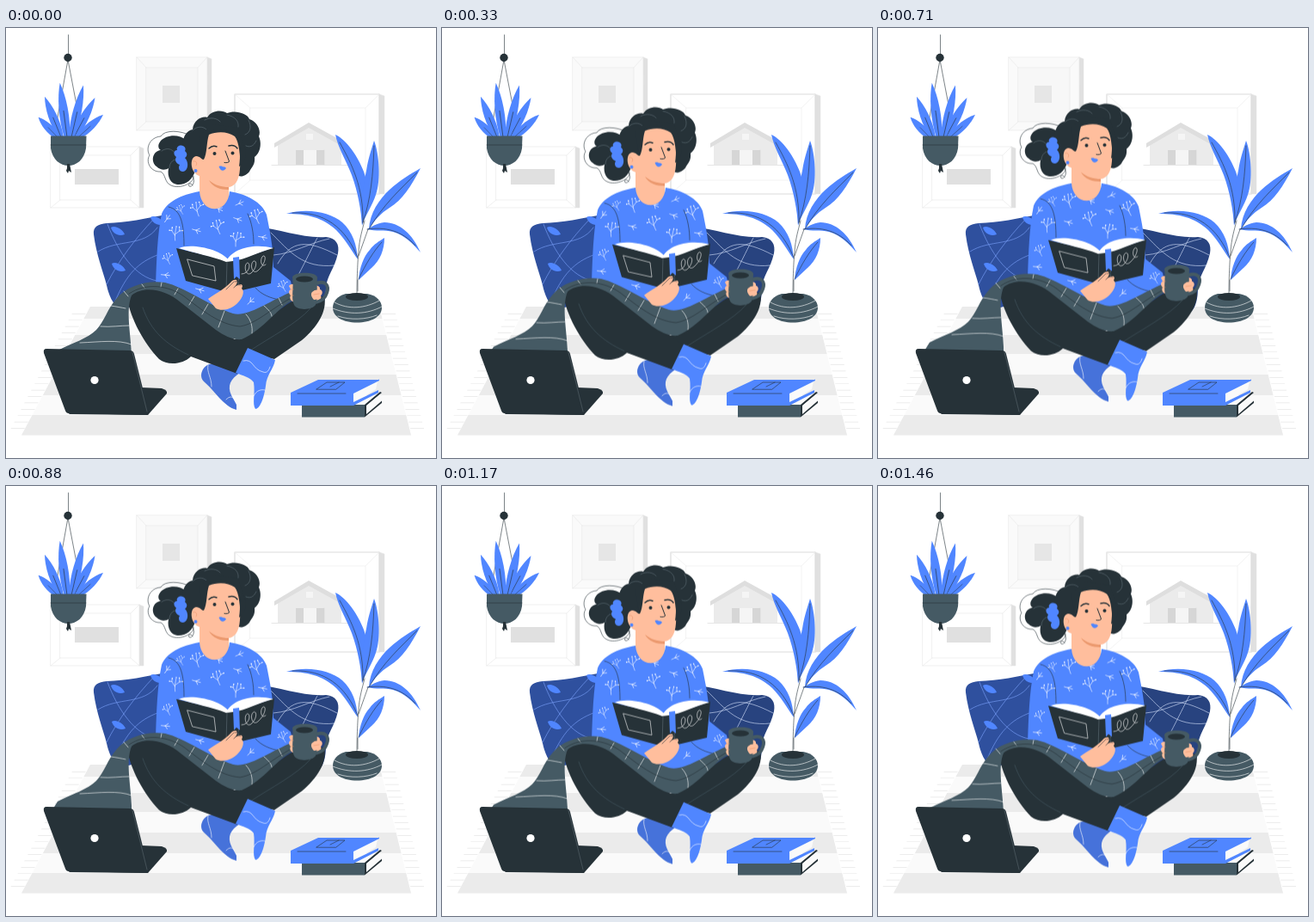
These frames come from a looping animation (500 px wide and 500 px high, 1500 ms). An HTML page:

```html
<!DOCTYPE html>
<html lang="en">
<head>
<meta charset="utf-8">
<title>Reading at home</title>
<style>
  html, body { margin: 0; width: 100%; height: 100%; overflow: hidden; background: #fff; }
  svg { display: block; width: 100vw; height: 100vh; }
  .blue { fill: #5086ff; }
  .dark { fill: #263238; }
  .gray { fill: #455a64; }
  .skin { fill: #ffbe9d; }
  .line { fill: none; stroke-width: .6; stroke-linecap: round; stroke-linejoin: round; }
  .ink { stroke: #263238; }
  .chalk { stroke: #fff; }
  .pale { stroke: #e6e6e6; }
  .bold { stroke-width: 1.5; }
  .float { animation: float 1.5s linear infinite; }
  @keyframes float { 50% { transform: translateY(-10px); } }
</style>
</head>
<body>
<svg viewBox="0 0 500 500" xmlns="http://www.w3.org/2000/svg">
  <defs>
    <clipPath id="rug"><path d="M98 324H434L471 473.500H18Z"/></clipPath>
    <path id="top" d="M225 190C203 194 187 202 181 216C176 240 175 270 174 302L205 318L262 345L300 330L335 316L331 294L311 278C311 255 306 232 303 217C298 203 280 193 260 190C258 217 227 217 225 190Z"/>
    <clipPath id="topClip"><use href="#top"/></clipPath>
    <g id="blade">
      <path class="blue" d="M-3 0C-7 -22 -5 -46 0 -62C5 -46 7 -22 3 0Z"/>
      <path class="line ink" d="M0 0V-30"/>
    </g>
    <g id="sprig" class="line chalk">
      <path d="M1 10C-1 4 0 -2 0 -7M0 4L-5 -2M0 2L5 -3M-5 -2H-8M-5 -2V-6M5 -3L9 -4M5 -3L4 -8"/>
      <path stroke-width="1.600" d="M-8 -2h0M-5 -6h0M9 -4h0M4 -8h0M0 -8h0"/>
    </g>
    <path id="twig" class="line chalk" d="M-4 2L5 -2M0 0L2 -4M0 0L4 2"/>
    <path id="petal" class="blue" d="M-8 -4C-4 -7 5 -3 8 4C1 7 -6 3 -8 -4Z"/>
  </defs>

  <!-- pictures on the wall -->
  <g class="line pale">
    <path fill="#e0e0e0" d="M234 34L239 36V119H234Z"/>
    <path fill="#fafafa" d="M152 34H234V119H152Z"/>
    <path fill="#f7f7f7" d="M163 46H223V109H163ZM152 34L163 46M234 34L223 46M152 119L163 109M234 119L223 109"/>
    <path fill="#e6e6e6" stroke="none" d="M182 67H202V87H182Z"/>

    <path fill="#e0e0e0" d="M155 138L160 140V209H155Z"/>
    <path fill="#fff" d="M52 138H155V209H52Z"/>
    <path d="M63 148H145V200H63ZM52 138L63 148M155 138L145 148M52 209L63 200M155 209L145 200"/>
    <path fill="#e0e0e0" stroke="none" d="M80 164H131V182H80Z"/>

    <path fill="#e0e0e0" d="M434 77L440 79V193H434Z"/>
    <path fill="#fff" stroke="#dcdcdc" stroke-width="1.200" d="M266 77H434V193H266Z"/>
    <path stroke="#ebebeb" d="M284 93H418V177H284ZM266 77L284 93M434 77L418 93M266 193L284 177M434 193L418 177"/>
  </g>
  <path fill="#ebebeb" d="M316 134L352 113L390 133V159H316Z"/>
  <path fill="#dedede" d="M352 110L392 132V138L352 116L312 139V134Z"/>
  <path fill="#d6d6d6" d="M337 142H370V159H337Z"/>
  <path fill="#f5f5f5" d="M346 142H361V159H346ZM349 123H357V130H349Z"/>
  <path class="line" stroke="#d6d6d6" d="M309 159.500H397M370 142V159"/>

  <!-- hanging plant -->
  <path class="line ink" d="M72.500 8V30M72 37L56 126M72 37L89 126"/>
  <circle class="dark" cx="72" cy="34.500" r="4.700"/>
  <use href="#blade" transform="translate(60 127) rotate(-44) scale(.9 .52)"/>
  <use href="#blade" transform="translate(84 127) rotate(48) scale(.9 .63)"/>
  <use href="#blade" transform="translate(64 127) rotate(-22) scale(1 .82)"/>
  <use href="#blade" transform="translate(79 127) rotate(28) scale(1 .84)"/>
  <use href="#blade" transform="translate(76 127) rotate(13)"/>
  <use href="#blade" transform="translate(71 127) rotate(-7.500) scale(1.050 1.030)"/>
  <path class="gray" d="M52 125.500H93.500L93 140C91 153 82 160 72.500 160S54 153 52 140Z"/>
  <path class="line ink" d="M52 136H93"/>
  <path class="dark" d="M71 158H74L75 163L76 168L73 166L72 169L70 166L71 163Z"/>

  <!-- rug -->
  <g clip-path="url(#rug)">
    <path fill="#fafafa" d="M0 324H500V474H0Z"/>
    <path fill="#ebebeb" d="M0 324H500V338H0ZM0 357H500V379H0ZM0 403H500V427H0ZM0 450H500V474H0Z"/>
  </g>
  <g fill="none" stroke="#e6e6e6" stroke-width="16" stroke-dasharray=".7 6.700">
    <path transform="translate(89 324) skewX(-28)" d="M0 8V146"/>
    <path transform="translate(443 324) skewX(13.900)" d="M0 8V146"/>
  </g>

  <!-- cushions -->
  <path fill="#2f509e" d="M102 240C101 231 107 228 117 227C140 226 162 222 190 216L250 240L240 330L170 322C155 318 146 326 134 326C124 324 119 308 117 299C113 283 105 264 102 240Z"/>
  <path class="line" stroke="#7fa5ff" d="M107 260C130 245 160 255 176 232M117 298C130 272 150 245 172 222M126 320C140 285 155 272 176 264M118 228C130 260 150 290 176 294"/>
  <use href="#petal" x="130" y="236"/>
  <use href="#petal" x="131" y="278"/>
  <use href="#petal" x="176" y="224"/>
  <path fill="#28437f" d="M290 231C320 234 346 245 372 243C384 244 388 252 386 262C382 280 373 288 372 302C372 318 368 331 358 333L290 330Z"/>
  <path class="line" stroke="#dbe6ff" d="M308 238C330 260 345 280 382 276M311 264C335 262 352 250 376 245M316 274C332 246 350 246 385 264M340 287C350 268 356 255 362 244"/>

  <!-- potted plant -->
  <path class="line ink" d="M408 314C408 290 409 270 410 260C411 245 414 236 417 224M410 265L421 234M409 293V306"/>
  <path class="blue" d="M383 124C396 130 409 149 416 167C424 188 420 208 414 230C413 212 409 190 402 171C395 153 386 139 383 124Z"/>
  <path class="blue" d="M428 131C434 146 436 178 430 194C426 206 419 216 414 229C413 205 415 183 419 166C421 152 425 141 428 131Z"/>
  <path class="blue" d="M482 163C471 184 461 200 446 209C436 215 428 224 422 234C423 215 434 199 446 188C458 177 470 170 482 163Z"/>
  <path class="blue" d="M482 261C473 240 458 226 440 226C431 227 425 231 420 234C430 237 440 234 450 237C464 241 473 251 482 261Z"/>
  <path class="blue" d="M326 216C350 209 377 214 391 226C403 237 408 252 409 269C401 258 395 246 384 235C368 220 350 216 326 216Z"/>
  <path class="blue" d="M440 244C440 258 435 270 425 279L410 293C411 279 416 265 423 258C428 251 434 248 440 244Z"/>
  <path class="line ink" d="M388 133C402 158 416 185 415 227M428 137C427 170 424 200 415 226M478 168C458 188 438 206 422 234M476 253C460 235 440 231 420 234M333 215C370 213 395 232 409 267M437 249C427 260 418 275 410 292"/>
  <path class="gray" d="M395 309C385 312 380 318 380 325C380 336 392 342.500 408 342.500S437 336 437 325C437 318 431 311 420 309Z"/>
  <ellipse class="dark" cx="408" cy="312.500" rx="13" ry="4.500"/>
  <path class="line chalk" d="M382 319C398 328 418 326 434 317M380 326C399 334 420 333 437 324M386 335C400 340 419 339 431 334"/>

  <g class="float">
    <!-- hair -->
    <path class="line ink" d="M214 125C204 119 184 118 180 126C167 127 162 140 167 148C162 155 168 168 180 167C186 170 184 180 192 183C202 188 220 180 218 172M215 170C222 176 217 186 213 184C211 181 215 179 217 183"/>
    <path class="dark" d="M210 131C200 122 186 125 180 131C175 137 178 141 180 142C170 143 168 156 175 161C180 166 186 165 189 163C187 174 192 181 199 182C208 183 217 177 220 166L229 150Z"/>
    <path class="dark" d="M208 148C202 134 207 120 217 118C218 107 228 102 234 104C239 95 252 95 257 99C266 95 281 99 283 106C292 109 297 119 294 126C298 135 295 146 289 150C290 160 285 162 283 167C277 174 271 173 269 171L229 160L224 164Z"/>
    <path class="line" stroke="#607078" d="M231 107C238 103 246 105 249 109M257 101C267 103 271 109 270 115M282 107C286 115 284 122 278 124M217 119C222 114 229 114 233 118M291 131C288 138 283 139 279 137M181 143C186 139 193 140 196 145M190 163C190 156 195 152 200 153"/>
    <path class="blue" d="M201 137C207 135 210 140 208 143C212 146 210 150 208 151C213 156 212 166 206 167C201 167 200 162 202 159C197 157 196 153 198 150C194 147 195 142 199 142C198 140 199 138 201 137Z"/>

    <!-- face and neck -->
    <path class="skin" d="M236 124C245 120 258 120 266 126C271 132 273 150 272 164C271 178 266 184 259 185V205C251 220 230 217 225 203V172C214 169 213 150 221 149C226 149 227 153 230 153C234 146 233 133 236 124Z"/>
    <path fill="#eb996e" d="M236 177C243 183 251 185 259 185V188C249 188 240 185 236 177Z"/>
    <path class="dark" d="M229 153C231 141 231 130 236 121C246 115 260 117 269 127C272 135 273 149 271 161C278 158 280 149 278 140L270 116L240 112L225 125Z"/>
    <circle class="dark" cx="242.500" cy="146" r="2"/>
    <circle class="dark" cx="263.500" cy="145.500" r="2"/>
    <path class="line ink bold" d="M236 140C239 137 242 136.500 245 138M259 137C263 136 267 137 269 140"/>
    <path class="line ink" style="stroke-width:1" d="M255 143L259.500 155C259.500 156.500 256 157 254 156.500"/>
    <path class="blue" d="M247.500 161C250 160 252 161 252 161.500C254 161 255 162 256 163C254 166 250 168 247.500 161Z"/>
    <path class="line" stroke="#eb996e" d="M218 155C221 154 223 157 221 160"/>
    <circle class="blue" cx="220.500" cy="166" r="2"/>

    <!-- sweater -->
    <use href="#top" class="blue"/>
    <g clip-path="url(#topClip)">
      <use href="#sprig" transform="translate(203 211) rotate(-20) scale(.6)"/>
      <use href="#sprig" transform="translate(222 210) rotate(-8) scale(.9)"/>
      <use href="#sprig" transform="translate(246 231) rotate(-12) scale(.9)"/>
      <use href="#sprig" transform="translate(268 245) rotate(12) scale(.9)"/>
      <use href="#sprig" transform="translate(291 219) rotate(-15) scale(.9)"/>
      <use href="#sprig" transform="translate(197 238) rotate(8) scale(.9)"/>
      <use href="#sprig" transform="translate(188 268) rotate(-15) scale(.7)"/>
      <use href="#sprig" transform="translate(322 300) rotate(-20) scale(.7)"/>
      <use href="#twig" x="271" y="204"/>
      <use href="#twig" transform="translate(269 222) rotate(45)"/>
      <use href="#twig" transform="translate(298 243) rotate(35)"/>
      <use href="#twig" transform="translate(187 222) rotate(-30)"/>
      <use href="#twig" transform="translate(247 210) rotate(50)"/>
      <use href="#twig" transform="translate(221 235) rotate(40)"/>
      <use href="#twig" transform="translate(185 287) rotate(30)"/>
      <use href="#twig" transform="translate(225 304) rotate(40)"/>
      <use href="#twig" transform="translate(284 318) rotate(-20)"/>
    </g>
    <path class="line ink" d="M189 208C204 211 207 229 207 253M281 216C286 226 288 240 288 251M290 302C297 310 307 314 318 316"/>

    <!-- legs and socks -->
    <path fill="#4672da" d="M246 389L272 401C261 408 257 416 262 427L268 438V444C253 440 243 422 230 411C224 405 228 394 236 391Z"/>
    <path class="line chalk" d="M235 392C233 400 239 406 239 417M256 432C260 428 263 428 266 432"/>
    <path class="dark" d="M262 364C295 350 315 326 340 314L370 312C374 329 362 348 344 363L312 385L279 378Z"/>
    <path class="dark" d="M141 315C148 299 173 297 192 308L282 374L269 402L215 382C206 391 188 393 178 385C160 366 145 338 141 315Z"/>
    <path class="line" stroke="#455a64" d="M159 325C168 352 186 368 212 380M284 375C308 359 338 344 354 326"/>
    <path class="blue" d="M281 372L313 386C311 397 303 403 302 416C300 431 295 443 290 443C286 437 290 425 288 412C284 406 275 404 267 401Z"/>
    <path class="line chalk" d="M276 387C288 384 286 397 299 400C304 402 306 397 307 394M288 428C291 421 297 420 301 421"/>

    <!-- blanket -->
    <path class="gray" d="M52 388L60 375C78 366 95 361 105 351C114 342 118 326 129 314C140 301 162 293 185 296C207 301 237 323 264 332C281 336 302 320 329 308L336 315C316 324 300 351 274 362C264 363 254 358 244 351L203 319C186 304 160 299 146 311C139 328 145 354 146 380V390Z"/>
    <path class="line chalk" d="M110 347C121 348 134 346 143 346M86 366C110 365 130 362 146 368M122 323C129 324 134 325 139 326M137 306L142 312M158 298L161 302M181 296L180 301M200 303L196 310M219 312L213 322M235 321L228 333M254 329L247 348M279 333C285 339 287 348 286 355M300 323C306 328 309 332 309 335M317 314L321 322"/>
    <path class="line ink" d="M143 309C164 295 190 300 207 312C228 328 248 345 272 347C291 344 306 328 333 313"/>

    <!-- book -->
    <path class="dark" d="M198 256L257 270L271 269L312 255L308 297L270 306L256 307L209 294Z"/>
    <path fill="#fff" d="M201 256C216 250 250 257 260 271L256 272C239 265 219 262 201 256ZM256 272C262 257 287 250 311 256C294 260 279 269 264 271Z"/>
    <path class="line" stroke="#607078" d="M257 272L256 306M271 269L270 305"/>
    <path class="line chalk" d="M211 269L242 277L244 294L217 288Z"/>
    <path class="line chalk" d="M274 286C283 286 285 274 281 273C276 274 278 290 285 285C292 279 292 270 288 271C283 274 286 288 293 282C302 274 303 264 299 265C295 268 296 280 302 275"/>
    <path class="blue" d="M264 267L271 266L272 292L268 289L265 292Z"/>

    <!-- hand on book -->
    <path class="skin" d="M235 315C243 309 255 303 261 296C265 291 271 292 268 298L266 301C272 296 277 298 274 303C278 306 275 314 270 319C263 327 251 330 244 326Z"/>
    <path class="line ink" d="M256 304L265 295M265 302C267 299 270 298 273 299M266 295L274 294"/>

    <!-- mug and hand -->
    <path class="skin" d="M329 300C332 296 336 298 336 301V319C331 318 329 314 331 311C328 308 329 305 331 304Z"/>
    <path class="skin" d="M355 301C360 298 366 300 365 304C369 305 368 310 366 311C368 316 363 319 357 318Z"/>
    <path fill="none" stroke="#455a64" stroke-width="4" d="M361 297C372 293 376 300 373 308C371 315 365 318 360 319"/>
    <path class="gray" d="M333 290C334 283 361 283 362 290C361 302 363 314 360 322C356 328 339 329 335 322C331 314 335 302 333 290Z"/>
    <ellipse class="dark" cx="347" cy="292" rx="10" ry="3.500"/>
    <path class="skin" d="M356 307C360 303 366 304 365 308C367 311 364 316 358 316C355 313 354 309 356 307Z"/>
    <path class="line" stroke="#eb996e" d="M358 310L364 309M331 304H334M331 311H334"/>
  </g>

  <!-- laptop -->
  <path class="dark" d="M70 446L157 418L181 419Q188 421 187 425L165 450L74 449Z"/>
  <path class="dark" d="M47 373L144 375Q148 375 149 379L166 447Q166 450 163 450L73 448Q70 448 69 445L44 378Q43 373 47 373Z"/>
  <path class="line" stroke="#5b6970" d="M147 377L164 446"/>
  <circle fill="#fff" cx="103" cy="409.500" r="4.600"/>

  <!-- stacked books -->
  <path class="gray" d="M344 438H417V452.500H344Z"/>
  <path fill="#fafafa" d="M417 438L435 423L434 434L417 450Z"/>
  <path class="dark" d="M417 438L435 423L437 424L419 439V449L437 433.500V436L417 452.500Z"/>
  <path fill="#fafafa" d="M419 439.500L435 426L434 435L419 448Z"/>
  <path class="blue" d="M331 424L363 409H434L404 424V439H331Z"/>
  <path fill="#fafafa" d="M404 424L432 411L430 420L404 436Z"/>
  <path class="blue" d="M404 423L434 408.500V410L404 425ZM404 435L433 421V424L404 439Z"/>
  <path class="line ink" d="M361 420L373 412H394L384 420ZM377 417L387 412M339 425H395"/>
</svg>
</body>
</html>
```
